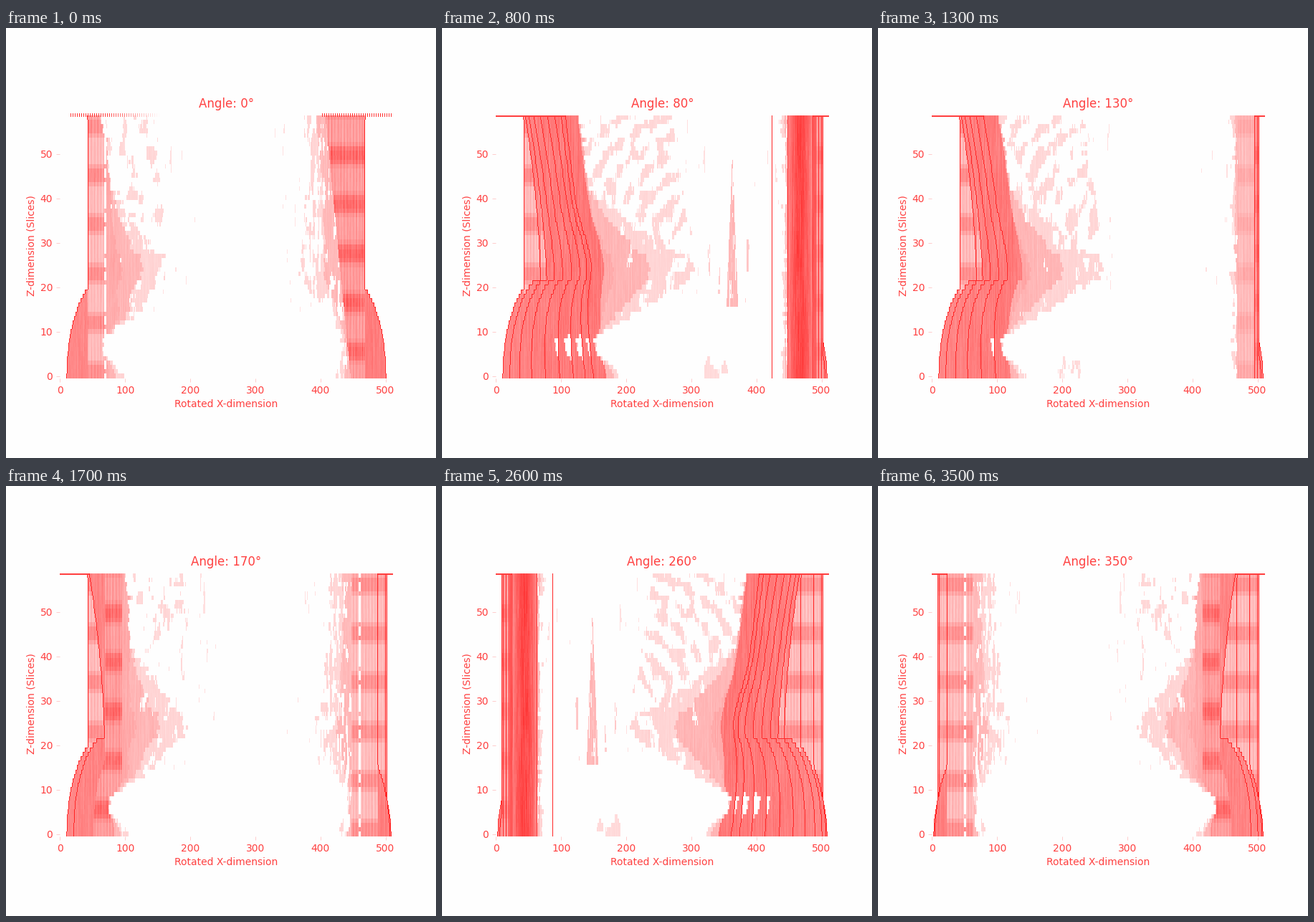
A matplotlib script for the animation above (3600 ms loop, 600x600 px).

```python
import numpy as np
import matplotlib.pyplot as plt
from matplotlib.animation import FuncAnimation

W, H, TOP = 465, 370, 4            # plot size in pixels, rows above the data
MID, ROWS, ROW_H = 307.5, 59, 6.2  # rotation axis, slices, slice height
STEP, COUNT = 10, 36
INK = "#ff4040"

rng = np.random.default_rng(7)
U = np.arange(W)[None, :] - (W - 1) / 2   # distance from the axis
Z = np.arange(ROWS)[:, None]


def smooth(a, n, axis):
    kernel = np.ones(n) / n
    return np.apply_along_axis(np.convolve, axis, a, kernel, mode="same")


def noise(nz, nx):
    a = smooth(smooth(rng.normal(size=(ROWS, W)), nz, 0), nx, 1)
    return a / a.std()


PATCH, STREAK, GRAIN = noise(3, 9), noise(7, 3), noise(9, 1)
JITTER = rng.normal(0, 1.3, (ROWS, 1))


def ramp(z0, z1):
    return np.clip((Z - z0) / (z1 - z0), 0, 1)


def bump(z0, width):
    return np.exp(-((Z - z0) / width) ** 2)


def bands(start):
    d = np.abs((Z - start + 5.5) % 11 - 5.5)
    return np.clip(1.6 - d * 0.55, 0, 1)


# Body cross-section per slice: half width, half depth, centre offset
HALF_W = 177 + 46 * (1 - ramp(0, 22) ** 2) ** 0.6 + 17 * ramp(22, 58) ** 2
HALF_D = 138 - 13 * bump(26, 8)
OFFSET = 45 - 0.7 * Z

ARMS = ramp(22, 14)
FOOT = ramp(5, 0)
RISE = ramp(9, 22)
FILL = np.minimum(RISE, ramp(42, 26))
RIND = 20 + 12 * bump(22, 6) - 14 * bump(7, 3.5)


def project(th):
    """Shade and coverage of one view, for angles below half a turn."""
    s, c = np.sin(np.radians(th)), np.cos(np.radians(th))
    flat = abs(c)
    w = flat ** 6
    edge_on = s > 0.9

    # curved table: two corners joined by an arc
    table_l = max(121 * s - 193 * flat, -224)
    corner = 121 * s + 193 * flat
    table_r = min(245 - 35 * s if s > 0.64 else corner, 224)
    reach = np.hypot(HALF_W * c, HALF_D * s)
    body_l = OFFSET * s - reach
    lo = np.minimum(body_l, table_l)
    hi = np.maximum(OFFSET * s + reach, table_r)

    # inner limits of the solid margins and of the tissue beside them
    lean = 0.6 * w * Z
    amp = 60 + 50 * s
    ls = body_l + RIND + 40 * w * ARMS + lean * (c < 0) + JITTER
    ls = np.maximum(ls, lo + 4)
    rs = table_r - 20 - 18 * s ** 8 - (lean if c > 0 else 18 * w)
    fill = ls + amp * FILL + 20 * FOOT + 2 * JITTER
    lp = np.maximum(fill, ls + amp * 1.2 * ramp(25, 32))
    rp = rs - 7 - w * (50 * FILL + 25 * ramp(30, 40) + 14 * FOOT) + 2 * JITTER

    patch = np.roll(PATCH, int(th * 1.3), 1)
    streak = np.roll(STREAK, int(th * 1.7), 1)
    v = np.zeros((ROWS, W))

    # left tissue: dense near the body, arcs above
    arc = np.sin(np.hypot(U - 52, 196 - ROW_H * Z) * 2 * np.pi / 27)
    rays = patch + 1.5 * s * arc > 0.6 + 0.4 * w
    v[(U < lp) & (Z > 22) & rays] = 0.15
    f = (U - ls) / np.maximum(fill - ls, 1)
    dense = (f < 1) & (patch > -2.4 + 1.8 * f)
    v = np.where(dense, np.where(f < 0.45, 0.28, 0.16), v)

    # right tissue
    g = (rs - U) / np.maximum(rs - rp, 1)
    tissue = (g < 1) & (streak + patch > -1.6 + 2 * g)
    v = np.where(tissue, np.where(g < 0.4, 0.27, 0.16), v)

    # loose specks
    near = ((U > lp) & (U < lp + 45)) | ((U < rp) & (U > rp - 40))
    v[near & (streak > 2.2) & (Z > 14)] = 0.12

    # far end of the table
    d = U - table_l - 12
    if s > 0.85:
        core = (np.abs(d) < 8 * ramp(50, 16)) & (Z > 15)
        v[core & (streak > -1.2)] = 0.27
        fringe = (d > -35) & (d < 25) & (np.abs(Z - 23) < 8)
        v[fringe & (streak > 1.5)] = 0.2
    if s > 0.5:
        v[(np.abs(d + 22) < 17) & (Z < 2 + patch) & (patch > -0.8)] = 0.14

    # solid margins; the two table sides carry shifted bands
    lines = 0.04 * np.sin(U * 2 * np.pi / 4.3) * flat
    sides = [0.26 + 0.17 * flat ** 2 * bands(1) + lines,
             0.38 + 0.2 * flat ** 2 * bands(5.5) + lines]
    left, right = sides if c > 0 else sides[::-1]
    if edge_on:
        t = np.clip((U - rs) / (table_r - rs), 0, 1)
        right = 0.45 + 0.27 * np.sin(np.pi * t)
    tabled = (U < table_l + 24) & (flat > 0.9)
    v = np.where(U < ls, np.where(tabled, left, 0.33), v)
    v = np.where(U > rs, right, v)
    skin = (U < table_l) & (U < lo + 30 - 12 * s) & (U < ls)
    v = np.where(skin, 0.47 + 0.06 * s, v)
    v = np.where(U > table_r, 0.5, v)

    # dashed gap between table and body
    if flat > 0.9:
        gap = table_l + 24 if c > 0 else table_r - 25
        v[(np.abs(U - gap) < 1.8) & (np.sin(Z * 1.9) < 0.8)] = 0

    v *= 1 + 0.06 * GRAIN
    if edge_on:
        for x in (corner, rs):
            v = np.where(np.abs(U - x) < 0.6, 0.85, v)
    return np.clip(v, 0, 1), (U >= lo) & (U <= hi)


def expand(a):
    y = np.arange(H - TOP)[::-1]
    return a[np.minimum((y / ROW_H).astype(int), ROWS - 1)]


def outline(mask):
    m = np.pad(np.pad(mask, ((1, 1), (0, 0)), mode="edge"), ((0, 0), (1, 1)))
    inner = m[:-2, 1:-1] & m[2:, 1:-1] & m[1:-1, :-2] & m[1:-1, 2:]
    return mask & ~inner


def header(shade, k, covered):
    """Top edge: a fading comb in the first view, then a line beside the body."""
    if k:
        shade[4:6, ~covered] = 0.75
        return
    x = U[0] + MID
    right = x > 441
    shade[0] = np.where(right, 0.6, 0.35 * np.clip((300 - x) / 105, 0, 1) * (x > 88))
    teeth = (np.arange(W) % 3 == 0) & (x > 88)
    depth = np.where(right, 0.8, np.clip((215 - x) / 100, 0, 0.8))
    shade[1:6, teeth] = np.maximum(shade[1:6, teeth], depth[teeth])


def build():
    views = [project(th) for th in range(0, 180, STEP)]
    shade = np.zeros((H, W))
    frames = []
    for k in range(COUNT):
        v, mask = views[k % len(views)]
        if k >= len(views):
            v, mask = v[:, ::-1], mask[:, ::-1]
        v, mask = expand(v), expand(mask)
        v = np.where(outline(mask), 0.85, v)
        # each view hides the earlier ones only where it has content
        shade[TOP:][mask] = v[mask]
        full = shade.copy()
        header(full, k, mask[0])
        rgb = np.full((H, W, 3), 254, np.uint8)
        rgb[..., 0] = np.where(full > 0, 255, 254)
        rgb[..., 1:] = (254 * (1 - full))[..., None]
        frames.append(rgb)
    return frames


FRAMES = build()

plt.rcParams["font.family"] = "DejaVu Sans"
fig = plt.figure(figsize=(6, 6), dpi=100, facecolor="#fefefe")
ax = fig.add_axes([75 / 600, 111 / 600, W / 600, H / 600], facecolor="#fefefe")
img = ax.imshow(FRAMES[0], extent=(-0.5, 511.5, -0.5, H / ROW_H - 0.5),
                aspect="auto", interpolation="nearest")
ax.set_xticks(range(0, 501, 100))
ax.set_yticks(range(0, 51, 10))
ax.tick_params(color="#ffc4c4", labelcolor=INK, width=0.6)
ax.spines[:].set_visible(False)
ax.set_xlabel("Rotated X-dimension", color=INK)
ax.set_ylabel("Z-dimension (Slices)", color=INK)
title = ax.set_title("Angle: 0°", color=INK)


def draw(k):
    img.set_data(FRAMES[k])
    title.set_text(f"Angle: {k * STEP}°")
    return img, title


anim = FuncAnimation(fig, draw, frames=COUNT, interval=100,
                     repeat=True, repeat_delay=0, blit=False)
plt.show()
```
